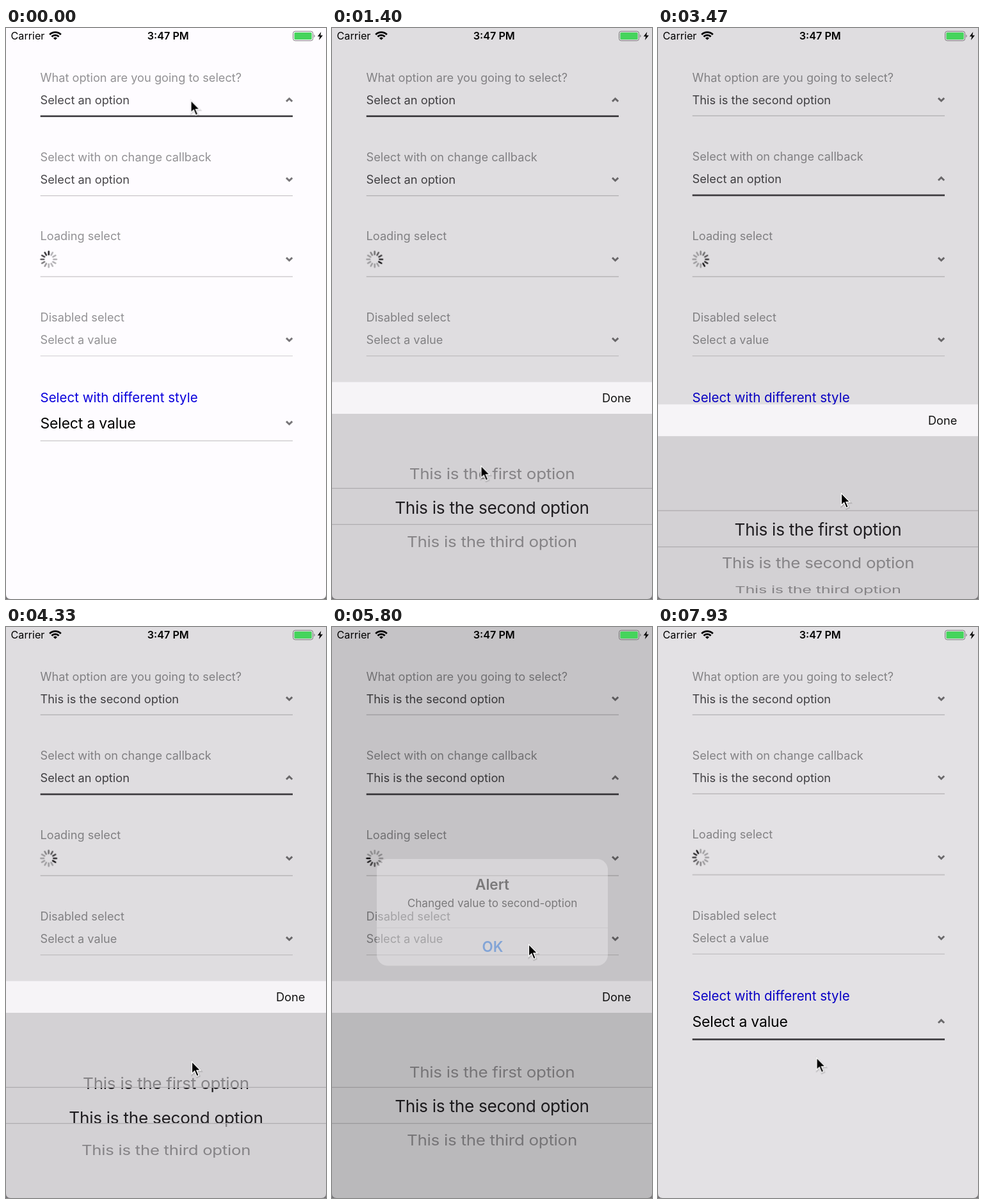
An HTML page for the animation above (8000 ms loop, 500 by 891 pixels).

```html
<!DOCTYPE html>
<html lang="en">
<head>
<meta charset="utf-8">
<title>Select fields</title>
<style>
html, body { margin: 0; width: 100%; height: 100%; overflow: hidden; background: #fefcff; }
svg { display: block; width: 500px; height: 891px; font-family: Inter, Roboto, sans-serif; font-optical-sizing: none; }
.label { font-size: 18.22px; fill: #929194; }
.value { font-size: 18.28px; fill: #48464a; }
.muted { font-size: 18.15px; fill: #929194; }
.blue { font-size: 20.5px; fill: #0a00dc; }
.large { font-size: 23px; letter-spacing: -.2px; fill: #000; }
.chevron { fill: none; stroke: #777578; stroke-width: 2.9; }
.row { font-size: 26.2px; letter-spacing: -.28px; text-anchor: middle; }
.bold { font-weight: 600; }
.middle { text-anchor: middle; }

#veil, #sheet, #dim, #alert, #cursor, #touch { animation: 8s linear infinite; }
#veil { animation-name: veil; }
#sheet { animation-name: sheet; }
#dim { animation-name: dim; }
#alert { animation-name: alert, pop; transform-origin: 250.5px 445px; }
#cursor { animation-name: move; animation-timing-function: ease-in-out; }
#touch { animation-name: touch; }
#spinner { animation: spin 1s steps(12) -12ms infinite; }

@keyframes spin { to { transform: rotate(360deg); } }
@keyframes veil {
  0%, .9%, 28.5%, 36.4%, 85%, 95.4% { opacity: 0; }
  5.2%, 24.5%, 40.7%, 81%, 99.7%, 100% { opacity: 1; }
}
@keyframes sheet {
  0%, 4.6%, 28.5%, 40%, 85%, 100% { transform: translateY(339px); animation-timing-function: ease-out; }
  10%, 24.5%, 44.6%, 81% { transform: none; animation-timing-function: ease-in; }
}
@keyframes dim {
  0%, 58.3%, 73.3%, 100% { opacity: 0; }
  62.3%, 70.4% { opacity: 1; }
}
@keyframes alert {
  0%, 58.3%, 73.8%, 100% { opacity: 0; }
  62.3%, 70.4% { opacity: 1; }
}
@keyframes pop {
  0%, 58.3% { transform: scale(1.15); animation-timing-function: ease-out; }
  62.3%, 100% { transform: none; }
}
@keyframes touch {
  0%, 11.4%, 15.5%, 23.8%, 25.4%, 47.6%, 52.5%, 61.8%, 65%, 68.8%, 70.6%, 79.6%, 81.4%, 100% { opacity: 0; }
  11.8%, 14.8%, 24.2%, 24.8%, 48%, 51.8%, 62.3%, 64%, 69.2%, 70%, 80%, 80.8% { opacity: .85; }
}
@keyframes move {
  0%, 3% { transform: translate(288.5px, 112.2px); }
  10.5%, 11.8% { transform: translate(230px, 735px); }
  15%, 17.6% { transform: translate(232.5px, 682.2px); }
  22%, 25.5% { transform: translate(448px, 578px); }
  33%, 37% { transform: translate(283px, 246.2px); }
  43%, 48% { transform: translate(286px, 725px); }
  52%, 56% { transform: translate(290px, 677.2px); }
  61.5%, 64.5% { transform: translate(302.5px, 627px); }
  68%, 73% { transform: translate(307px, 494.2px); }
  78%, 81.5% { transform: translate(446px, 580px); }
  91%, 95.5% { transform: translate(262px, 612px); }
  99%, 100% { transform: translate(247.5px, 671.2px); }
}
</style>
</head>
<body>
<svg viewBox="0 0 500 891">
  <defs>
    <clipPath id="inside"><path d="M0 718H500V775H0Z"/></clipPath>
    <clipPath id="outside"><path d="M0 602H500V718H0ZM0 775H500V891H0Z"/></clipPath>
  </defs>
  <rect width="500" height="891" fill="#fefcff"/>
  <g id="fields"></g>
  <rect id="veil" width="500" height="891" fill="#000" fill-opacity=".12"/>

  <g id="sheet">
    <rect y="552.5" width="500" height="50" fill="#f6f4f7"/>
    <rect y="602" width="500" height="289" fill="#d3d1d4"/>
    <text x="467.3" y="584" text-anchor="end" font-size="18.2" fill="#111">Done</text>
    <g clip-path="url(#outside)" fill="#858386" class="rows"></g>
    <g clip-path="url(#inside)" fill="#1f1d20" class="rows"></g>
    <path d="M0 718.3H500M0 774.7H500" stroke="#aeacaf" stroke-width="1.2"/>
  </g>

  <rect id="dim" width="500" height="891" fill="#000" fill-opacity=".435"/>
  <g id="alert">
    <rect x="70" y="362" width="361" height="166.5" rx="17" fill="#f7f5f8"/>
    <path d="M70 469.5H431" stroke="#d5d3d6" stroke-width="1.2"/>
    <g class="middle">
      <text class="bold" x="250.5" y="410" font-size="22.6">Alert</text>
      <text x="250.5" y="437" font-size="17.15">Changed value to second-option</text>
      <text class="bold" x="251" y="507" font-size="22.3" fill="#1673f2">OK</text>
    </g>
  </g>

  <g id="status">
    <text x="7.5" y="18" font-size="16.2">Carrier</text>
    <g fill="none" stroke="#000" stroke-width="2.8">
      <path d="M68.2 10.2A12.5 12.5 0 0 1 85.8 10.2M71.4 13.5A8 8 0 0 1 82.6 13.5"/>
      <path d="M77 18.2L74.4 15.8A4 4 0 0 1 79.6 15.8Z" fill="#000" stroke-width=".8"/>
    </g>
    <text class="bold middle" x="253.3" y="18" font-size="16.2">3:47 PM</text>
    <rect x="448.6" y="5.2" width="31" height="14.6" rx="3.2" fill="none" stroke="#777" stroke-width="1"/>
    <rect x="450.4" y="7" width="27.4" height="11" rx="1.6" fill="#45d45c"/>
    <path d="M481.3 10Q484 12.5 481.3 15Z" fill="#777"/>
    <path d="M492.3 6L486.8 13.2H490.3L489 19L495 11.4H491.3Z"/>
  </g>

  <path d="M0 884Q0 891 7 891H0ZM500 884Q500 891 493 891H500Z" fill="#747275"/>
  <g id="cursor">
    <circle id="touch" cx=".5" cy="2" r="26.5" fill="#c0bec1" stroke="#cfcdd0"/>
    <path d="M1 2V21L5.3 17L8.6 25L12 23.5L8.6 15.8H14.5Z" fill="none" stroke="#000" stroke-opacity=".15" stroke-width="3"/>
    <path d="M.4 .8V19.8L4.7 15.8L8 23.8L11.3 22.3L8 14.6H13.8Z" stroke="#fff" stroke-width="1.4"/>
  </g>
</svg>
<script>
const LOOP = 8000, PLACEHOLDER = 'Select an option', CHOSEN = 'This is the second option';
const OPTIONS = ['first', 'second', 'third'].map(n => `This is the ${n} option`);
const ROW_ANGLE = 27.4 * Math.PI / 180, RADIUS = 115, CENTER = 747.2;
const POINT = 4 / 3;

// label baseline, value baseline, chevron centre, top of underline
const FIELDS = [
  { y: [83.5, 118.5, 112, 136.3], label: 'What option are you going to select?', value: PLACEHOLDER },
  { y: [208, 243, 236.5, 261], label: 'Select with on change callback', value: PLACEHOLDER },
  { y: [331, 361, 361, 387.3], label: 'Loading select', loading: true },
  { y: [458, 493, 486.5, 511], label: 'Disabled select', value: 'Select a value', valueClass: 'muted', line: '#dad8db' },
  { y: [584, 625, 616.5, 643.5], label: 'Select with different style', value: 'Select a value', labelClass: 'blue', valueClass: 'large' }
];

function add(parent, tag, attrs, text = '') {
  const el = document.createElementNS('http://www.w3.org/2000/svg', tag);
  for (const key in attrs) el.setAttribute(key, attrs[key]);
  el.textContent = text;
  return parent.appendChild(el);
}

function addSpinner(parent, y) {
  const place = add(parent, 'g', { transform: `translate(66.7 ${y})` });
  const wheel = add(place, 'g', { id: 'spinner' });
  for (let i = 0; i < 12; i++) {
    add(wheel, 'path', {
      d: 'M0 -7.6V-12.2', transform: `rotate(${-30 * i})`, stroke: '#1c1a1d',
      'stroke-width': 2.5, 'stroke-linecap': 'round', 'stroke-opacity': Math.max(.33, 1 - i * .11)
    });
  }
}

const fields = FIELDS.map(f => {
  const [labelY, valueY, chevronY, lineY] = f.y;
  const group = add(document.getElementById('fields'), 'g', {});
  add(group, 'text', { x: 53.5, y: labelY, class: 'label ' + (f.labelClass || '') }, f.label);
  if (f.loading) addSpinner(group, valueY);
  const value = add(group, 'text', { x: 53.5, y: valueY, class: 'value ' + (f.valueClass || '') }, f.value);
  const chevron = add(group, 'path', { class: 'chevron', d: 'M-4.6 -2.6L0 1.8L4.6 -2.6' });
  const line = add(group, 'rect', { x: 53.7, y: lineY, width: 394.3 });
  return { group, value, chevron, line, chevronY, lineColor: f.line || '#cbc9cc' };
});

const rowSets = [...document.querySelectorAll('.rows')].map(set =>
  OPTIONS.map(text => add(set, 'text', { class: 'row', y: 9.5 }, text)));

function focusedField(t) {
  if (t < 2000) return 0;
  if (t < 2790) return -1;
  if (t < 6450) return 1;
  return t < 7540 ? -1 : 4;
}

const clamp = v => Math.min(1, Math.max(0, v));

// Dragged at constant speed, then coasts to rest on the next row.
function swipe(t, start, release, end, dragged) {
  if (t < release) return dragged * clamp((t - start) / (release - start));
  const left = 1 - clamp((t - release) / (end - release));
  return 1 - (1 - dragged) * left * left;
}

// A focused field has a line one point thicker, which pushes down the fields below.
function drawFields(t) {
  const focus = focusedField(t);
  fields.forEach((f, i) => {
    const open = i === focus;
    const shift = i > 0 && (focus < 0 || focus >= i) ? -POINT : 0;
    f.group.setAttribute('transform', `translate(0 ${shift})`);
    f.chevron.setAttribute('transform', `translate(442.6 ${f.chevronY}) scale(1 ${open ? -1 : 1})`);
    f.line.setAttribute('fill', open ? '#434145' : f.lineColor);
    f.line.setAttribute('height', open ? 2 * POINT : POINT);
  });
  fields[0].value.textContent = t < 1480 ? PLACEHOLDER : CHOSEN;
  fields[1].value.textContent = t < 4660 ? PLACEHOLDER : CHOSEN;
}

function drawWheel(t) {
  const position = t < 2400 ? swipe(t, 920, 1200, 1500, .75) : swipe(t, 3860, 4160, 4700, .26);
  for (const rows of rowSets) rows.forEach((row, i) => {
    const angle = (i - position) * ROW_ANGLE;
    const depth = Math.cos(angle);
    const width = 1 - .08 * (1 - depth);
    row.setAttribute('transform', `translate(250 ${CENTER + RADIUS * Math.sin(angle)}) scale(${width} ${depth})`);
  });
}

const start = performance.now();
function draw(now) {
  const t = Math.max(0, now - start) % LOOP;
  drawFields(t);
  drawWheel(t);
  requestAnimationFrame(draw);
}
draw(start);
</script>
</body>
</html>
```
